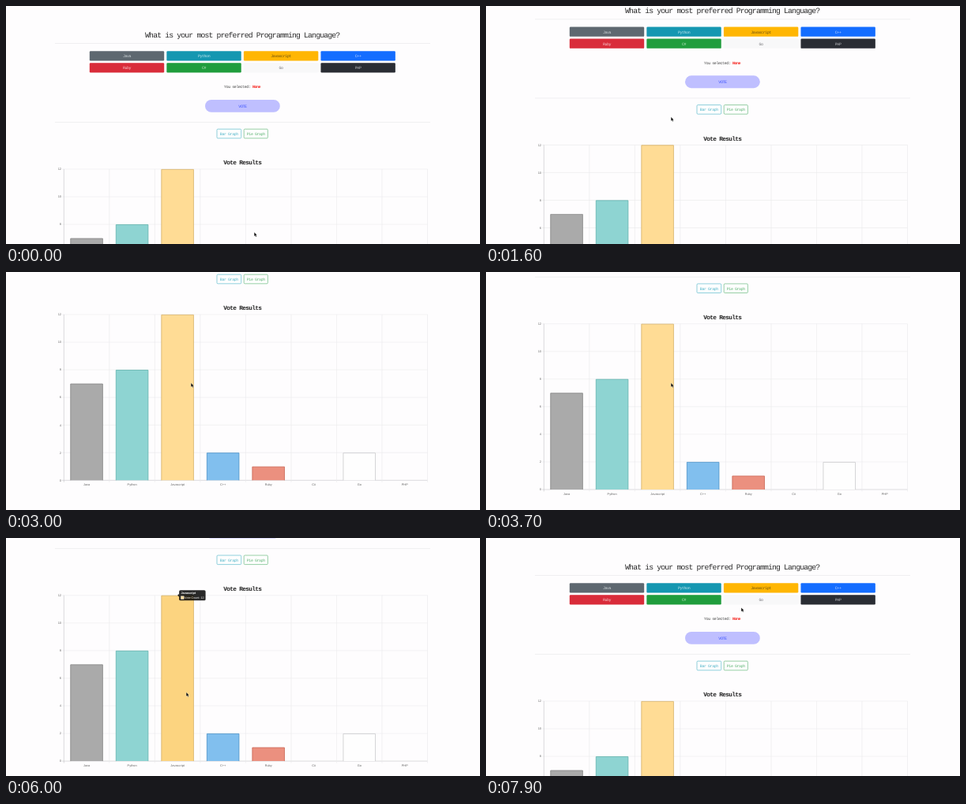
These frames come from a looping animation (600 px wide and 302 px high, 8 s). An HTML page:

```html
<!DOCTYPE html>
<html lang="en">
<head>
<meta charset="utf-8">
<title>Language poll</title>
<style>
  html, body { margin: 0; width: 100%; height: 100%; overflow: hidden; background: #fefdfe; }
  svg { display: block; width: 600px; height: 302px; }
  text { text-rendering: geometricPrecision; white-space: pre; }
  .mono { font-family: "Liberation Mono", "DejaVu Sans Mono", monospace; }
  .sans { font-family: "Liberation Sans", Arial, sans-serif; }
</style>
</head>
<body>
<svg id="stage" viewBox="0 0 600 302"></svg>
<script>
const LOOP = 8000, STEP = 100;
const stage = document.getElementById('stage');

function add(parent, tag, attrs, content) {
  const el = document.createElementNS('http://www.w3.org/2000/svg', tag);
  for (const key in attrs) el.setAttribute(key, attrs[key]);
  if (content !== undefined) el.textContent = content;
  parent.append(el);
  return el;
}
const rect = (parent, x, y, width, height, attrs) =>
  add(parent, 'rect', { x, y, width, height, ...attrs });
const line = (x1, y1, x2, y2, stroke, width = 0.6) =>
  add(page, 'line', { x1, y1, x2, y2, stroke, 'stroke-width': width });
const sans = (parent, x, y, size, fill, content, anchor = 'middle', weight = 400) =>
  add(parent, 'text', {
    x, y, fill, class: 'sans', 'font-size': size, 'text-anchor': anchor, 'font-weight': weight
  }, content);

// Tightly set monospace, centred on x; pitch is the advance per character
function mono(x, y, pitch, fill, content, weight = 400) {
  const size = pitch * 1.95;
  add(page, 'text', {
    x, y, fill, class: 'mono', 'font-size': size, 'font-weight': weight,
    'letter-spacing': pitch - size * 0.6, 'text-anchor': 'middle'
  }, content);
}

const page = add(stage, 'g', {});

// Poll form
mono(299.2, 39.8, 5.03, '#2b2b2b', 'What is your most preferred Programming Language?');
for (const y of [47.5, 147.6]) line(62, y, 537, y, '#ececee', 0.8);

const languages = [
  { name: 'Java', button: '#5e6870', ink: '#ccd2d6', votes: 7, fill: '#aaa', edge: '#858585', hover: '#a8a8a8' },
  { name: 'Python', button: '#1597b1', ink: '#c4e6ec', votes: 8, fill: '#8ed4d2', edge: '#62b3ae', hover: '#80dad9' },
  { name: 'Javascript', button: '#ffb602', ink: '#6b5110', votes: 12, fill: '#ffdc95', edge: '#d5b269', hover: '#fcd480' },
  { name: 'C++', button: '#146dff', ink: '#bdd6ff', votes: 2, fill: '#81bfee', edge: '#4b92c8' },
  { name: 'Ruby', button: '#d92c3a', ink: '#f5c6ca', votes: 1, fill: '#eb907f', edge: '#c96553' },
  { name: 'C#', button: '#209d3d', ink: '#bfe4c7', votes: 0 },
  { name: 'Go', button: '#f8f8f9', ink: '#77777b', votes: 2, fill: '#fefefe', edge: '#c9c9cc' },
  { name: 'PHP', button: '#2a2d34', ink: '#b5b7bb', votes: 0 }
];
languages.forEach(({ name, button, ink }, i) => {
  const x = 105.8 + (i % 4) * 97.55, y = i < 4 ? 57.2 : 72.2;
  rect(page, x, y, 94.4, 12.3, { rx: 1.2, fill: button });
  mono(x + 47.2, y + 8, 2.56, ink, name);
});

mono(292.7, 104.3, 2.56, '#444', 'You selected:');
mono(317, 104.3, 2.56, '#f5221c', 'None', 700);
rect(page, 252, 119, 94.8, 15.8, { rx: 7.9, fill: '#bfbfff' });
mono(299.5, 128.7, 2.6, '#4057ff', 'VOTE');

function outlineButton(x, width, color, name) {
  rect(page, x, 156.2, width, 11.6, {
    rx: 1.2, fill: '#fefefe', stroke: color, 'stroke-width': 0.8, 'stroke-opacity': 0.8
  });
  mono(x + width / 2, 163.9, 2.56, color, name);
}
outlineButton(267, 30.7, '#4fb5c9', 'Bar Graph');
outlineButton(301.2, 30.2, '#5cb473', 'Pie Graph');
mono(299.3, 201.3, 4, '#222', 'Vote Results', 700);

// Bar chart
const LEFT = 73.3, TOP = 207, BASE = 417.3, CELL = 57.53;
const RIGHT = LEFT + CELL * 8, BAR = CELL * 0.72, EDGE = 0.8;
const valueY = v => BASE - (BASE - TOP) * v / 12;
const centerX = i => LEFT + CELL * (i + 0.5);
const gridColor = i => i ? '#e9e9eb' : '#c3c3c6';

for (let v = 0; v <= 12; v += 2) {
  line(LEFT - 2.5, valueY(v), RIGHT, valueY(v), gridColor(v));
  sans(page, 70, valueY(v) + 1.3, 3.9, '#666', v, 'end');
}
for (let i = 0; i <= 8; i++)
  line(LEFT + CELL * i, TOP, LEFT + CELL * i, BASE + 2.5, gridColor(i));

const bars = languages.map(({ name, votes, fill, edge }, i) => {
  sans(page, centerX(i), 423.8, 3.9, '#666', name);
  if (!votes) return null;
  const half = (BAR - EDGE) / 2, x = centerX(i);
  return add(page, 'path', {
    d: `M${x - half} ${BASE}V${valueY(votes) + EDGE / 2}H${x + half}V${BASE}`,
    fill, stroke: edge, 'stroke-width': EDGE
  });
});

// Tooltip, with its origin at the caret tip
const tip = add(page, 'g', {});
const tipFill = { fill: '#000', 'fill-opacity': 0.84 };
add(tip, 'path', { d: 'M0 0L2 -2V2Z', ...tipFill });
const tipBox = rect(tip, 2, -6.5, 33.5, 13, { rx: 1.6, ...tipFill });
const tipName = sans(tip, 4.3, -1.6, 3.8, '#fff', '', 'start', 700);
const tipKey = rect(tip, 4.5, 1.1, 3.5, 3.5, { stroke: '#fff', 'stroke-width': 0.5 });
const tipCount = sans(tip, 9, 4.2, 3.7, '#eee', '', 'start');

const cursor = add(stage, 'path', {
  d: 'M0 0V4.7L1.1 3.8L1.9 5.6L2.7 5.2L1.9 3.5H3.3Z',
  fill: '#111', stroke: '#fff', 'stroke-width': 0.5, 'paint-order': 'stroke'
});

// Eased moves: start, end, then where to arrive
const scrolls = [[1100, 2840, 153], [3000, 4200, 134.2], [6400, 7100, -5], [7200, 7600, 0]];
const pointerMoves = [
  [0, 900, 234.3, 141], [3700, 4600, 163.3, 165.5], [4600, 4950, 104, 188],
  [5350, 5900, 228.3, 196], [7250, 7850, 323.2, 88.5]
];
// Hovered bar from a given time on; -1 is none
const hovers = [[0, -1], [3750, 2], [4520, 1], [4800, 0], [5400, 1], [5620, 2], [7350, -1]];

const mix = (a, b, p) => a + (b - a) * p;
const clamp = p => Math.max(0, Math.min(1, p));
const smooth = p => p * p * (3 - 2 * p);
const easeOut = p => 1 - (1 - p) ** 4;

const follow = (origin, moves, t) => moves.reduce((pos, [from, to, ...goal]) => {
  const p = smooth(clamp((t - from) / (to - from)));
  return pos.map((v, i) => mix(v, goal[i], p));
}, origin);

function drawTip(t) {
  const n = hovers.filter(h => h[0] <= t).length - 1;
  const [since, now] = hovers[n];
  const before = n ? hovers[n - 1][1] : -1;
  const ease = easeOut(clamp((t - since) / 400));
  const shown = now < 0 ? before : now;
  const from = before < 0 ? shown : before;

  bars.forEach((bar, i) => {
    const { fill, hover } = languages[i];
    if (bar) bar.setAttribute('fill', i === now ? hover : fill);
  });
  // Crossing the gap between two bars dims the tooltip halfway
  const fadeFrom = before < 0 ? 0 : now < 0 ? 1 : 0.5;
  tip.setAttribute('opacity', mix(fadeFrom, now < 0 ? 0 : 1, ease));
  if (shown < 0) return;

  const { name, votes, fill } = languages[shown];
  const x = mix(centerX(from), centerX(shown), ease);
  const y = mix(valueY(languages[from].votes), valueY(votes), ease);
  tip.setAttribute('transform', `translate(${x} ${y})`);
  tipName.textContent = name;
  tipCount.textContent = 'Vote Count: ' + votes;
  tipBox.setAttribute('width', votes > 9 ? 33.5 : 31.5);
  tipKey.setAttribute('fill', fill);
}

function draw(t) {
  const [scroll] = follow([0], scrolls, t);
  const [x, y] = follow([314.3, 287.3], pointerMoves, t);
  page.setAttribute('transform', `translate(0 ${-scroll})`);
  cursor.setAttribute('transform', `translate(${x} ${y})`);
  drawTip(t);
}

const start = performance.now();
function tick() {
  const t = (performance.now() - start) % LOOP;
  draw(Math.floor(t / STEP) * STEP);
  requestAnimationFrame(tick);
}
tick();
</script>
</body>
</html>
```
